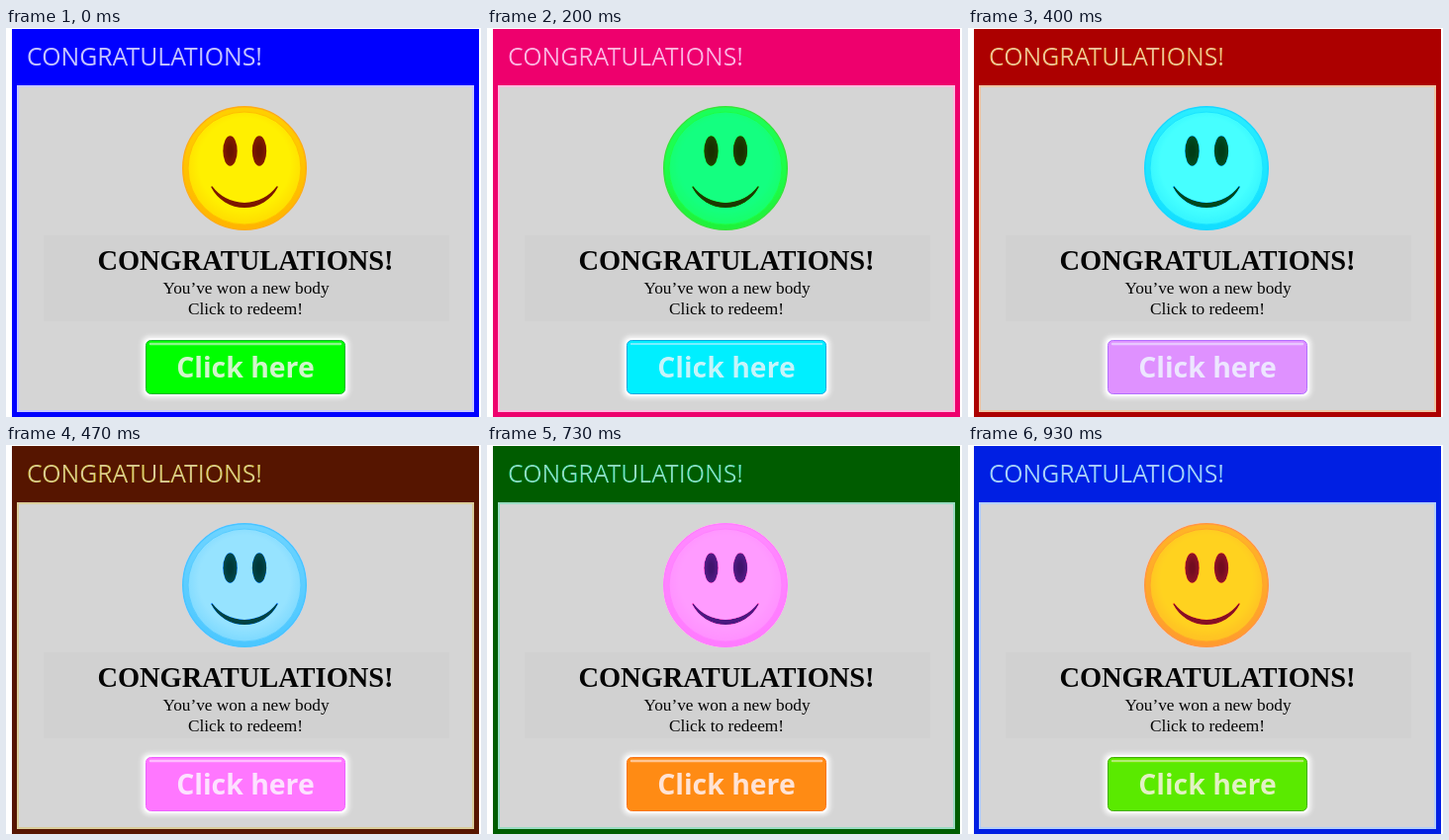
An HTML page for the animation above (990 ms loop, 480 by 394 pixels).

```html
<!DOCTYPE html>
<html lang="en">
<head>
<meta charset="utf-8">
<title>Congratulations</title>
<style>
  html, body { margin: 0; width: 100%; height: 100%; overflow: hidden; background: #fff; }
  svg { display: block; width: 480px; height: 394px; animation: hue 990ms step-end infinite; }
  text { font-kerning: none; }
  .title { font: 400 24.8px "Open Sans", sans-serif; font-kerning: normal; fill: #c4c4ff; }
  .label { font: 700 28.4px "Open Sans", sans-serif; fill: #d2f5cc; }
  .head { font: 700 28.45px "Liberation Serif", serif; }
  .copy { font: 400 17.3px "Liberation Serif", serif; }
  .mid { text-anchor: middle; fill: #050505; }

  /* 24 degrees per step, held for 70, 60 or 70 ms */
  @keyframes hue {
    0% { filter: hue-rotate(0deg); }
    7.07% { filter: hue-rotate(24deg); }
    13.13% { filter: hue-rotate(48deg); }
    20.2% { filter: hue-rotate(72deg); }
    27.27% { filter: hue-rotate(96deg); }
    33.33% { filter: hue-rotate(120deg); }
    40.4% { filter: hue-rotate(144deg); }
    47.47% { filter: hue-rotate(168deg); }
    53.53% { filter: hue-rotate(192deg); }
    60.6% { filter: hue-rotate(216deg); }
    67.67% { filter: hue-rotate(240deg); }
    73.73% { filter: hue-rotate(264deg); }
    80.8% { filter: hue-rotate(288deg); }
    87.87% { filter: hue-rotate(312deg); }
    93.93% { filter: hue-rotate(336deg); }
    100% { filter: hue-rotate(360deg); }
  }
</style>
</head>
<body>
<svg viewBox="0 0 480 394">
  <defs>
    <linearGradient id="rim" x1="0" y1="0" x2="0" y2="1">
      <stop offset="0" stop-color="#ffd000"/>
      <stop offset="1" stop-color="#ffb400"/>
    </linearGradient>
    <radialGradient id="skin" cx=".5" cy=".46" r=".54">
      <stop offset=".75" stop-color="#fff000"/>
      <stop offset="1" stop-color="#ffdc00"/>
    </radialGradient>
    <radialGradient id="eye">
      <stop offset=".3" stop-color="#6a1200"/>
      <stop offset="1" stop-color="#841a00"/>
    </radialGradient>
    <filter id="soft" x="-10%" y="-25%" width="120%" height="150%">
      <feGaussianBlur stdDeviation="2"/>
    </filter>
  </defs>

  <!-- window -->
  <rect width="480" height="394" fill="#fff"/>
  <rect x="6" y="1" width="472" height="393" fill="#00f"/>
  <rect x="11" y="58" width="462" height="331" fill="#c8c8ff"/>
  <rect x="13" y="60" width="458" height="327" fill="#d5d5d5"/>
  <rect x="38" y="210" width="410" height="87" fill="#d1d1d1"/>
  <text class="title" x="21" y="37.5">CONGRATULATIONS!</text>

  <!-- smiley -->
  <circle cx="241" cy="142" r="62.3" fill="url(#rim)" stroke="#ffac14" stroke-width="1.4"/>
  <circle cx="241" cy="142" r="57" fill="url(#skin)" stroke="#ffbe00"/>
  <g fill="url(#eye)">
    <ellipse cx="226.5" cy="124.5" rx="7.2" ry="15.2"/>
    <ellipse cx="256" cy="124.5" rx="7.2" ry="15.2"/>
  </g>
  <path d="M208 161A37 37 0 0 0 274 161A41 41 0 0 1 208 161Z" fill="#7c1600" stroke="#7c1600" stroke-width="1.5" stroke-linejoin="round"/>

  <!-- message -->
  <text class="head mid" x="242" y="244.5">CONGRATULATIONS!</text>
  <text class="copy mid" x="242.5" y="269">You’ve won a new body</text>
  <text class="copy mid" x="242" y="290">Click to redeem!</text>

  <!-- button -->
  <rect x="137" y="312" width="210" height="63" rx="8" fill="#f4f4f4" filter="url(#soft)"/>
  <rect x="139" y="314" width="206" height="59" rx="7" fill="#fafafa"/>
  <rect x="141.5" y="316.5" width="201" height="54" rx="5" fill="#0f0" stroke="#10b828"/>
  <path d="M146 320H338" stroke="#8cf58c" stroke-width="2.5" stroke-linecap="round"/>
  <text class="label" x="172.2" y="354">Click here</text>
</svg>
</body>
</html>
```
